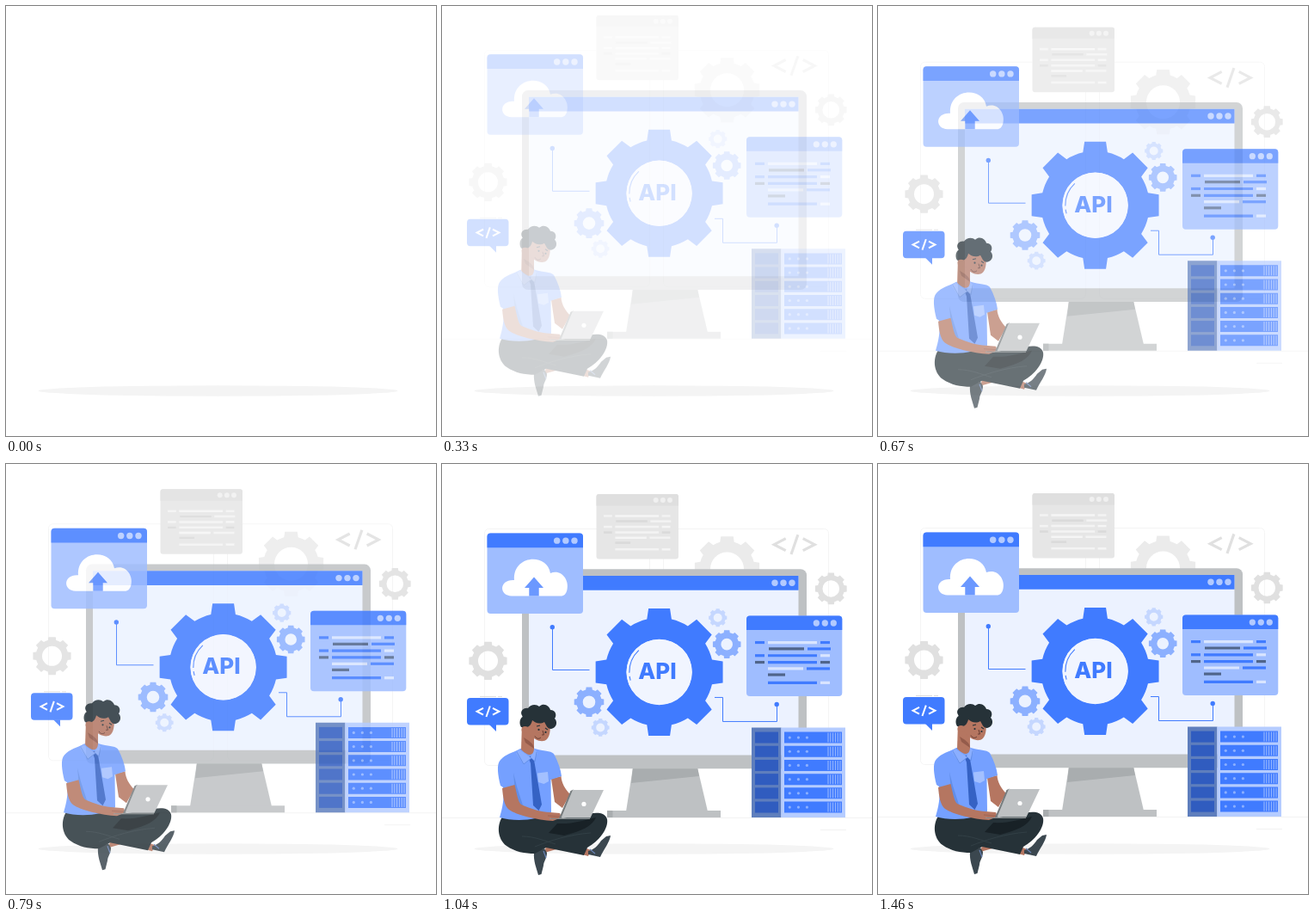
Write an HTML page with a canvas that moves like this. It is 500 px wide and 500 px high and loops after 1500 ms.

```html
<!DOCTYPE html>
<html lang="en">
<head>
<meta charset="utf-8">
<title>API illustration</title>
<style>
html, body { margin: 0; width: 100%; height: 100%; overflow: hidden; background: #fff; }
canvas { display: block; width: 100vw; height: 100vh; }
</style>
</head>
<body>
<canvas id="stage" width="500" height="500"></canvas>
<script>
const LOOP = 1500, FPS = 24, STEPS = 36, FIRST_VISIBLE = 4, DROP = 30;
const BLUE = '#407bff', PALE = '#9fbdff', SCREEN = '#ecf2ff', GREY = '#bec1c3';
const DARK = '#263238', SKIN = '#b57661';

const stage = document.getElementById('stage').getContext('2d');
const scratch = document.createElement('canvas');
scratch.width = scratch.height = 500;
const c = scratch.getContext('2d');

function rect(x, y, w, h, color, radius = 0) {
  c.fillStyle = color;
  c.beginPath();
  c.roundRect(x, y, w, h, radius);
  c.fill();
}

function dot(x, y, r, color) {
  c.fillStyle = color;
  c.beginPath();
  c.arc(x, y, r, 0, Math.PI * 2);
  c.fill();
}

function shape(d, color) {
  c.fillStyle = color;
  c.fill(new Path2D(d));
}

function line(d, color, width = 1) {
  c.strokeStyle = color;
  c.lineWidth = width;
  c.stroke(new Path2D(d));
}

function gear(x, y, R, hole, color, tooth = 0.19) {
  const r = R * 0.84, tip = Math.asin(tooth), root = Math.asin((tooth + 0.025) / 0.84);
  c.fillStyle = color;
  c.beginPath();
  for (let i = 0; i < 8; i++) {
    const a = i * Math.PI / 4;
    c.arc(x, y, r, a - Math.PI / 4 + root, a - root);
    for (const s of [-tip, tip]) c.lineTo(x + R * Math.cos(a + s), y + R * Math.sin(a + s));
  }
  c.closePath();
  c.moveTo(x + hole, y);
  c.arc(x, y, hole, 0, Math.PI * 2);
  c.fill('evenodd');
}

// A code symbol: two chevrons and a slash
function codeSign(x, y, s, color, width) {
  c.save();
  c.translate(x, y);
  c.scale(s, s);
  line('M-10-7L-23.5 0L-10 7M10-7L23.5 0L10 7M-3.7 11.3L4.2-11.3', color, width / s);
  c.restore();
}

// Each row: y, then segments as [from, to, palette index]
const CODE = [
  [0, [0, 11, 0], [15, 72, 1], [76, 87, 0]],
  [7.4, [16, 57, 2], [61, 88, 0]],
  [15.2, [0, 11, 0], [15, 72, 0], [76, 87, 1]],
  [23, [0, 11, 2], [15, 72, 0], [76, 87, 2]],
  [30.4, [15, 56, 1], [60, 87, 0]],
  [37.5, [15, 35, 2]],
  [46.8, [15, 72, 0], [76, 87, 1]]
];

function codeLines(x, y, sx, sy, palette, h) {
  for (const [row, ...parts] of CODE)
    for (const [a, b, i] of parts)
      rect(x + a * sx, y + row * sy - h / 2, (b - a) * sx, h, palette[i]);
}

function panel(x, y, w, h, bar, head, body, dots, radius = 4) {
  rect(x, y, w, h, body, radius);
  rect(x, y, w, bar, head, [radius, radius, 0, 0]);
  const r = bar * 0.22;
  for (let i = 0; i < 3; i++) dot(x + w - 10 + (i - 2) * r * 2.75, y + bar / 2 + 0.3, r, dots);
}

function background() {
  c.lineWidth = 1;
  c.strokeStyle = '#f4f4f4';
  for (const x of [49.5, 257.5]) {
    c.beginPath();
    c.roundRect(x, 74.5, 192, 275, 5);
    c.stroke();
  }
  line('M0 410.5H500M440 424.5H470', '#f2f2f2');
  line('M44 269.5H63M65 269.5H70', '#dcdcdc');
  panel(179.5, 34, 95.5, 75.5, 13.5, '#dfdfdf', '#e6e6e6', '#f0f0f0', 3);
  codeLines(188, 59.5, 0.89, 0.83, ['#f3f3f3', '#f5f5f5', '#dadada'], 2.5);
  codeSign(409.7, 92.7, 1, '#e0e0e0', 3.2);
  gear(331.5, 121, 38.3, 19.5, '#ebebeb');
  gear(53.5, 228, 22.5, 11.5, '#e0e0e0');
  gear(452.3, 144, 18.7, 9.8, '#e0e0e0');
}

function monitor() {
  shape('M222 352H297L309 403H214Z', GREY);
  shape('M222 352H297L299 362L220 370Z', '#a9adaf');
  rect(192, 402, 132, 8, GREY);
  rect(192, 402, 6.5, 8, '#a9adaf');
  rect(93, 121.3, 331, 232, GREY, 7);
  rect(101, 129, 313.5, 208.5, SCREEN);
  rect(101, 129, 313.5, 16.8, BLUE);
  for (const x of [387, 397, 407]) dot(x, 137.3, 3.7, '#b3caff');

  line('M128.5 189V238.5H171.5M389.5 279V298.5H326.5V270.5H317', BLUE);
  dot(128.3, 188.7, 2.7, BLUE);
  dot(389.2, 278.5, 2.7, BLUE);

  gear(171, 275.8, 17.6, 7.3, '#8cb0ff');
  gear(331.2, 208.7, 16.6, 6.8, '#8cb0ff');
  gear(184.2, 305.5, 10.6, 5, '#c5d7ff');
  gear(320.7, 177.8, 10.8, 5, '#c5d7ff');

  gear(252.6, 241, 75, 38, BLUE, 0.166);
  dot(252.6, 241, 38.2, '#f1f5ff');
  c.strokeStyle = BLUE;
  c.lineWidth = 1.1;
  for (const [from, to] of [[2.86, 3.0], [3.12, 3.96]]) {
    c.beginPath();
    c.arc(252.6, 241, 34.8, from, to);
    c.stroke();
  }
  c.fillStyle = BLUE;
  c.font = '800 26px Inter, Roboto, sans-serif';
  c.textAlign = 'center';
  c.fillText('API', 250.5, 249);
}

function uploadWindow() {
  panel(52.5, 79.5, 111.5, 93.5, 16.8, BLUE, PALE, '#b3caff');
  shape('M81 152.5C66 152 66 133 84 134C82 105 122 102 126 126' +
    'C139 121 148 134 145.5 145C144.5 150 142 152.5 138 152.5Z', '#fff');
  shape('M107 130.5L118 143H112.7V152.5H101.3V143H96Z', '#6b98ff');
}

function codeWindow() {
  panel(354, 175.5, 111.3, 93.5, 16.5, BLUE, PALE, '#b3caff');
  codeLines(364, 206.6, 1, 1, [BLUE, '#d9e5ff', '#50658a'], 3.2);
}

function server() {
  rect(360, 305.5, 34.5, 104.5, '#5e7ebd');
  rect(394.5, 305.5, 74.5, 104.5, '#b5ccff');
  for (let i = 0; i < 6; i++) {
    const y = 310.6 + i * 16.2;
    rect(364, y, 27, 13, '#305cbf');
    rect(398, y, 67, 13, BLUE);
    for (const x of [404.3, 414.4, 424.4]) dot(x, y + 6.5, 1.6, '#8cb0ff');
    for (let x = 448.5; x < 464; x += 2.8) rect(x, y + 1, 1, 11, PALE);
  }
}

function bubble() {
  rect(29, 271, 48.5, 31.5, BLUE, 4);
  shape('M55 302H63V310Z', BLUE);
  codeSign(53.5, 286.8, 0.55, '#fff', 2);
}

function legs() {
  shape('M121 444L136 441L133 447L119 451ZM163 444L173 448L170 455L163 453Z', SKIN);
  shape('M107 450L119 446L122 451C122 458 118 461 118 466L115.5 476L112 477C110 469 106 461 107 450Z', '#3b474f');
  shape('M170 449C176 448 181 443 185 437L191 432L196 431C195 439 188 447 184 456L170 453Z', '#3b474f');
  line('M118 449L121 457M172 447L178 452', '#6983b5', 1.2);
  shape('M72 407C63 417 64 435 75 443C85 450 96 452 108 452L121 445L165 454L169 445' +
    'C182 438 194 423 192 412C189 403 178 404 165 407L132 412Z', DARK);
  shape('M134 417C152 418 166 413 179 410C175 420 162 426 142 431L124 428Z', '#182126');
  line('M108 444C126 437 147 430 173 428M93 432C108 432 121 438 132 441', '#35434a', 0.8);
}

function torso() {
  shape('M127 365L138.500 362C139 370 143 377 149 383L140 399L131 392Z', SKIN);
  shape('M91 330L108 330C118 333 126 332 130 336C135 345 138 354 139 362L126.500 366L127 404' +
    'C111 414 84 415 67 410C70 400 73 387 71 375L68 373C65 361 63 348 68 343C74 336 82 335 91 330Z', '#75a0ff');
  shape('M83 358L87 374L96 402L86 391Z', '#628ee8');
  shape('M111 358.500L123 357L124 368L118.500 371L112 369Z', '#a3c0ff');
  shape('M100 339L106 339L107.500 346L116 395L112.500 402L106 396L103 347Z', '#3562c4');
  shape('M90 331L104 341L95 348L86 335ZM107 329L111 335L107 344L103 340Z', '#8aaeff');
  line('M87 334L95 348L104 341L108 345L110 334', '#5c89e2', 0.8);
  shape('M70 376L84.500 372C87 382 88 391 92 395C103 400 117 404 125 404L137 405L139 410L129 414' +
    'C111 413 86 407 78 401C72 396 71 386 70 376Z', SKIN);
  line('M123 408L137 409M127 411L135 411', '#965b49', 0.7);
}

function head() {
  shape('M93 302L107 310L107 331C106 338 101 340 92 331Z', SKIN);
  shape('M95 317C100 320 107 324 107 330L97 323Z', '#945b4b');
  shape('M98 294L124 294C127 305 126 315 122 319C117 324 107 320 102 313L98 309Z', SKIN);
  shape('M92 305C89 300 91 294 94 293C89 287 95 282 100 283C103 278 110 278 113 281' +
    'C119 276 125 281 126 285C132 285 134 291 131 295C135 299 133 306 127 307C122 307 121 302 119 299' +
    'C114 302 108 300 105 297C104 302 101 305 98 305Z', DARK);
  dot(96.5, 308, 4, SKIN);
  dot(112.500, 308, 1.1, DARK);
  dot(120.500, 311, 1.1, DARK);
  line('M108 315.500C110 319 113 319 115 317M117 309L118.500 314L116 314', '#5c352d', 0.9);
  line('M110 304L114 303M120 306L123 308', DARK, 1.1);
}

function laptop() {
  shape('M149.500 379L153 377.500L140 411H136Z', '#767b7d');
  shape('M152 378H188L172.500 410.500H138.500Z', GREY);
  c.fillStyle = '#fff';
  dot(165, 394.500, 2.6, '#fff');
  line('M125 411.500H172', '#8c9193', 1);
}

function person() {
  legs();
  torso();
  head();
  laptop();
}

const layers = [background, monitor, uploadWindow, codeWindow, server, bubble, person];

// cubic-bezier(.36, -.01, .5, 1.38): accelerates, then overshoots and settles
function ease(x) {
  const bezier = (a, b, s) => 3 * (1 - s) ** 2 * s * a + 3 * (1 - s) * s * s * b + s ** 3;
  let lo = 0, hi = 1;
  for (let i = 0; i < 24; i++) {
    const mid = (lo + hi) / 2;
    if (bezier(0.36, 0.5, mid) < x) lo = mid; else hi = mid;
  }
  return bezier(-0.01, 1.38, hi);
}

function draw(step) {
  stage.globalAlpha = 1;
  stage.fillStyle = '#fff';
  stage.fillRect(0, 0, 500, 500);
  stage.fillStyle = '#f4f4f4';
  stage.beginPath();
  stage.ellipse(246.5, 447.5, 209, 6.2, 0, 0, Math.PI * 2);
  stage.fill();
  if (step < FIRST_VISIBLE) return;

  const progress = ease((step + 1) / STEPS);
  stage.globalAlpha = Math.min(1, progress);
  for (const layer of layers) {
    c.clearRect(0, 0, 500, 500);
    c.save();
    c.translate(0, DROP * (progress - 1));
    layer();
    c.restore();
    stage.drawImage(scratch, 0, 0);
  }
}

const start = performance.now();
let shown = -1;

function tick() {
  const time = (performance.now() - start) % LOOP;
  const step = Math.floor((time + 4) * FPS / 1000) % STEPS;
  if (step !== shown) draw(shown = step);
  requestAnimationFrame(tick);
}
tick();
</script>
</body>
</html>
```
